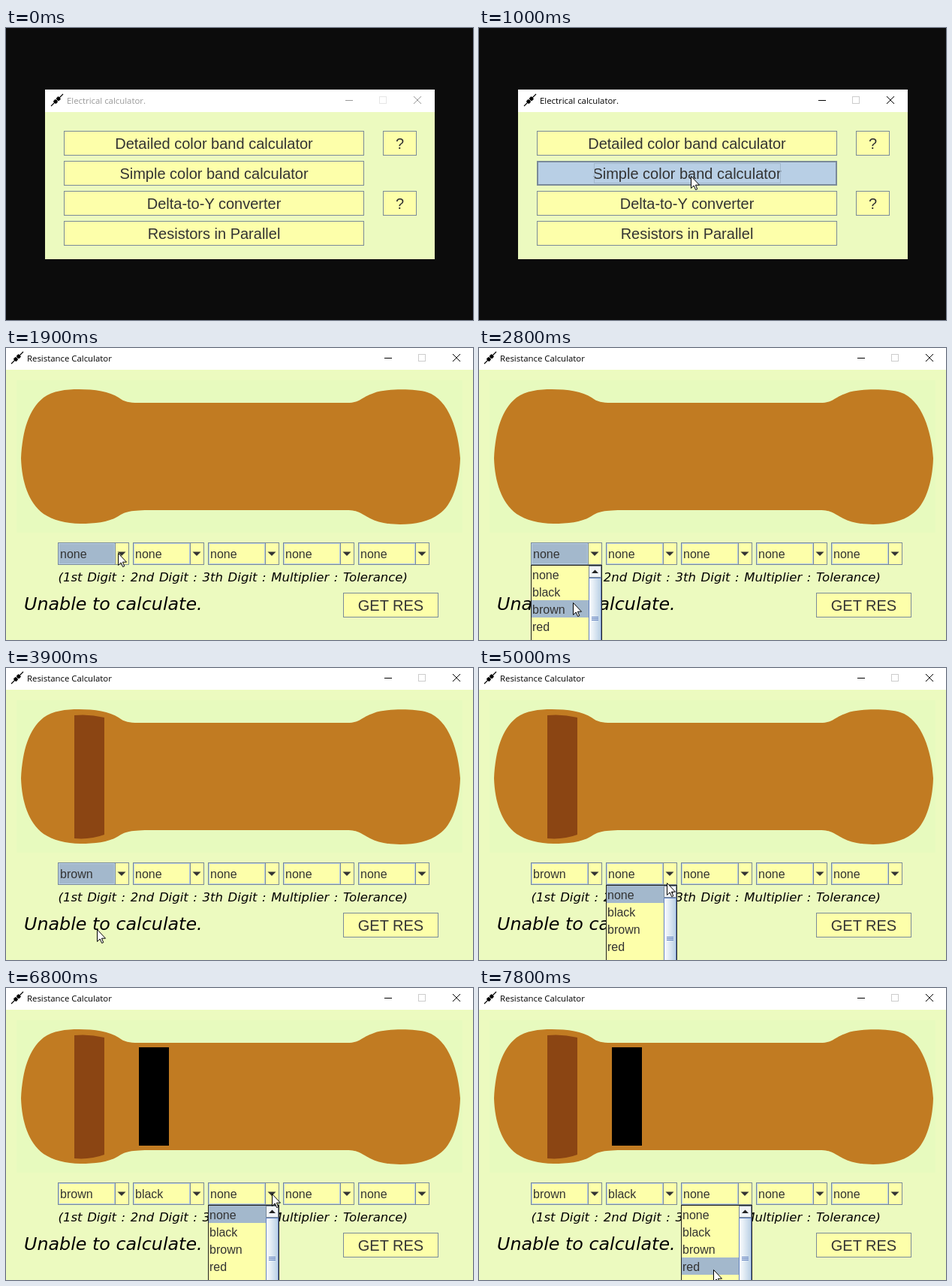
Recreate the animation shown at these times as an HTML page. Size 622 by 389 pixels, loop 8000 ms.

```html
<!DOCTYPE html>
<html lang="en">
<head>
<meta charset="utf-8">
<title>Resistance calculator demo</title>
<style>
  html, body { margin: 0; width: 622px; height: 389px; overflow: hidden; background: #0c0c0c; }
  svg { display: block; }
  text { white-space: pre; }
  .ui { font-family: "Liberation Sans", Arial, sans-serif; fill: #333; }
  .title { font: 11.4px "Open Sans", "Noto Sans", sans-serif; }
  .note { font-family: "DejaVu Sans", Verdana, sans-serif; font-style: italic; fill: #000; }
</style>
</head>
<body>
<svg id="stage" width="622" height="389" viewBox="0 0 622 389"></svg>
<script>
const LOOP = 8000, STEP = 100;
const PALE = '#ecfabf', YELLOW = '#fdffaa', EDGE = '#7a8a99', FOCUS = '#a3b8cc', PRESSED = '#b8cfe5';
const COLORS = ['none', 'black', 'brown', 'red'];
const ROW = 23, LIST_TOP = 291;
const stage = document.getElementById('stage');

// Pointer path: time, x, y
const PATH = [
  [0, 21, -18], [500, 278, 211], [600, 282, 197], [1200, 282, 197],
  [1600, 151, 268], [1700, 151, 268], [1900, 149, 273], [2000, 151, 272], [2300, 151, 272],
  [2900, 121, 348], [3900, 121, 348], [4600, 255, 271], [4900, 255, 271],
  [5100, 245, 300], [5200, 245, 300], [5500, 236, 340], [5700, 230, 328], [5800, 230, 328],
  [5900, 287, 318], [6200, 358, 276], [6300, 358, 276], [6400, 356, 275], [6500, 356, 275],
  [6600, 354, 274], [7100, 354, 274], [7800, 312, 375], [LOOP, 312, 375]
];

// Which list is open, and when
const POPUPS = [
  { box: 0, from: 2000, to: 3900 },
  { box: 1, from: 4700, to: 5900 },
  { box: 2, from: 6800, to: LOOP }
];

function pointerAt(t) {
  const i = Math.max(1, PATH.findIndex(p => p[0] >= t));
  const [t0, x0, y0] = PATH[i - 1], [t1, x1, y1] = PATH[i];
  const k = (t - t0) / (t1 - t0), e = (k + k * k * (3 - 2 * k)) / 2;
  return { x: Math.round(x0 + (x1 - x0) * e), y: Math.round(y0 + (y1 - y0) * e) };
}

const ramp = (t, a, b) => Math.min(1, Math.max(0, (t - a) / (b - a)));
const inside = (p, x, y, w, h) => p.x >= x && p.x < x + w && p.y >= y && p.y < y + h;

const fill = (x, y, w, h, color) =>
  `<rect x="${x}" y="${y}" width="${w}" height="${h}" fill="${color}" shape-rendering="crispEdges"/>`;
const frame = (x, y, w, h, stroke, color = 'none') =>
  `<rect x="${x + .5}" y="${y + .5}" width="${w - 1}" height="${h - 1}" fill="${color}" stroke="${stroke}"/>`;
const path = (d, attrs) => `<path d="${d}" ${attrs}/>`;
const label = (x, y, s, size, attrs = 'class="ui"') =>
  `<text x="${x}" y="${y}" font-size="${size}" ${attrs}>${s}</text>`;
const scaled = (body, cx, cy, s, alpha) =>
  `<g opacity="${alpha}" transform="translate(${cx} ${cy}) scale(${s}) translate(${-cx} ${-cy})">${body}</g>`;

function button(x, y, w, text, state = '') {
  let s = frame(x, y, w, 33, EDGE, state === 'pressed' ? PRESSED : YELLOW);
  if (state) s += frame(x + 1, y + 1, w - 2, 31, state === 'pressed' ? EDGE : PRESSED);
  return s + label(x + w / 2, y + 24, text, 20, 'class="ui" text-anchor="middle"');
}

function icon(x, y) {
  return `<g transform="translate(${x} ${y})">` +
    path('M0 16L16 0', 'stroke="#000" stroke-width="1.1"') +
    path('M4.5 11.5L11.5 4.5', 'stroke="#000" stroke-width="5" stroke-dasharray="4.2 1.2"') + '</g>';
}

function titleBar(x, y, text, textX, textY, minX, midY, active) {
  const ink = active ? '#000' : '#999';
  return icon(x, y) + label(textX, textY, text, 11.4, `class="title" fill="${ink}"`) +
    fill(minX, midY, 10, 1, ink) +
    frame(minX + 45, midY - 5, 10, 10, active ? '#ccc' : '#e6e6e6') +
    path(`M${minX + 91} ${midY - 5}l10 10m0 -10l-10 10`, `stroke="${ink}"`);
}

function menuWindow(t, p) {
  const names = ['Detailed color band calculator', 'Simple color band calculator',
    'Delta-to-Y converter', 'Resistors in Parallel'];
  let s = fill(52, 82, 519, 226, PALE) + fill(52, 82, 519, 30, '#fff') +
    titleBar(60, 88, 'Electrical calculator.', 81, 101, 452, 96, t === 1000);
  names.forEach((name, i) => {
    const y = 137 + 40 * i, over = inside(p, 77, y, 400, 33);
    s += button(77, y, 400, name, over ? (t >= 1000 ? 'pressed' : 'hover') : '');
    if (i % 2 === 0) s += button(502, y, 45, '?');
  });
  return t >= 1000 ? s + frame(153, 180, 249, 27, FOCUS) : s;
}

function resistor(t) {
  const body = 'M97 55C118 55 138 58 150 66C158 72 164 73 176 73H455C472 73 472 66 490 60' +
    'C505 54 545 54 561 59C590 68 603 112 605 147C604 180 594 210 577 221C564 231 545 235 525 235' +
    'C508 235 495 232 485 227C470 219 470 216 450 216H185C160 217 158 219 148 225C136 232 118 234 99 234' +
    'C80 234 62 229 50 221C30 206 21 178 20 147C22 110 30 82 50 66C62 57 80 55 97 55Z';
  let s = fill(14, 43, 594, 203, '#e7fabe') + path(body, 'fill="#c17b22"');
  if (t >= 3900) s += path('M91 63Q111 61 131 66V222Q112 229 91 227Z', 'fill="#8b4513"');
  if (t >= 5900) s += fill(177, 79, 40, 131, '#000');
  return s;
}

function comboBox(i, text, focused) {
  const x = 69 + 100 * i;
  return frame(x, 259, 95, 30, EDGE, YELLOW) + frame(x + 1, 260, 75, 28, PRESSED) +
    (focused ? fill(x + 2, 261, 73, 26, FOCUS) : '') +
    fill(x + 76, 260, 1, 28, EDGE) +
    path(`M${x + 79.5} 271.5h11l-5.5 5.5z`, 'fill="#333"') +
    label(x + 3, 280, text, 16);
}

function popup(i, p) {
  const x = 69 + 100 * i, bar = x + 77;
  const over = inside(p, x + 1, LIST_TOP, 76, 110);
  const picked = over ? Math.floor((p.y - LIST_TOP) / ROW) : 0;
  let s = frame(x, 289, 95, 187, '#222', YELLOW) +
    fill(x + 1, LIST_TOP - 1 + ROW * picked, 76, ROW, FOCUS);
  COLORS.forEach((c, k) => s += label(x + 2, 308 + ROW * k, c, 16));
  s += fill(bar, 290, 17, 110, '#eee') + frame(bar, 290, 17, 16, EDGE, '#f0f3f6') +
    path(`M${bar + 4} 300h9l-4.5 -4.5z`, 'fill="#222"') +
    frame(bar, 306, 17, 110, '#6382bf', 'url(#thumb)');
  for (let y = 358; y < 364; y += 2) s += fill(bar + 4, y, 9, 1, '#6382bf');
  return s;
}

function calculatorWindow(t, p) {
  const open = POPUPS.find(o => t >= o.from && t < o.to);
  const focus = t < 4700 ? 0 : t >= 5900 && t < 6800 ? 1 : -1;
  const values = [t >= 3900 ? 'brown' : 'none', t >= 5900 ? 'black' : 'none', 'none', 'none', 'none'];
  return fill(-2, -1, 626, 391, PALE) + fill(-2, -1, 626, 30, '#fff') +
    titleBar(7, 5, 'Resistance Calculator', 28, 18, 504, 13, true) +
    resistor(t) + values.map((v, i) => comboBox(i, v, i === focus)).join('') +
    label(69.5, 311, '(1st Digit : 2nd Digit : 3th Digit : Multiplier : Tolerance)', 16.5,
      'class="note" word-spacing="1.4"') +
    label(24, 349, 'Unable to calculate.', 23.8, 'class="note"') +
    button(449, 326, 127, 'GET RES') + (open ? popup(open.box, p) : '');
}

function pointer({ x, y }) {
  return path('M.5 .5V16.5L4.2 13L6.6 18.5L8.8 17.6L6.4 12.2H11.5Z',
    `transform="translate(${x} ${y})" fill="#fff" stroke="#000"`);
}

function render(time) {
  const t = Math.floor(time / STEP) * STEP;
  const p = pointerAt(t);
  let s = '<defs><linearGradient id="thumb"><stop stop-color="#fff"/>' +
    `<stop offset="1" stop-color="${PRESSED}"/></linearGradient></defs>` + fill(0, 0, 622, 389, '#0c0c0c');
  if (t < 1300) {
    const out = ramp(t, 1000, 1225);
    s += scaled(menuWindow(t, p), 311.5, 195, 1 - .05 * out, 1 - out);
  }
  if (t > 1000) {
    const shown = 1 - (1 - ramp(t, 1000, 1380)) ** 2;
    s += scaled(calculatorWindow(t, p), 315, 200, 1 - .053 * (1 - shown), shown);
  }
  stage.innerHTML = s + pointer(p);
  return t;
}

let last = render(0);
const start = performance.now();
function tick() {
  const time = (performance.now() - start) % LOOP;
  if (Math.floor(time / STEP) * STEP !== last) last = render(time);
  requestAnimationFrame(tick);
}
requestAnimationFrame(tick);
</script>
</body>
</html>
```
